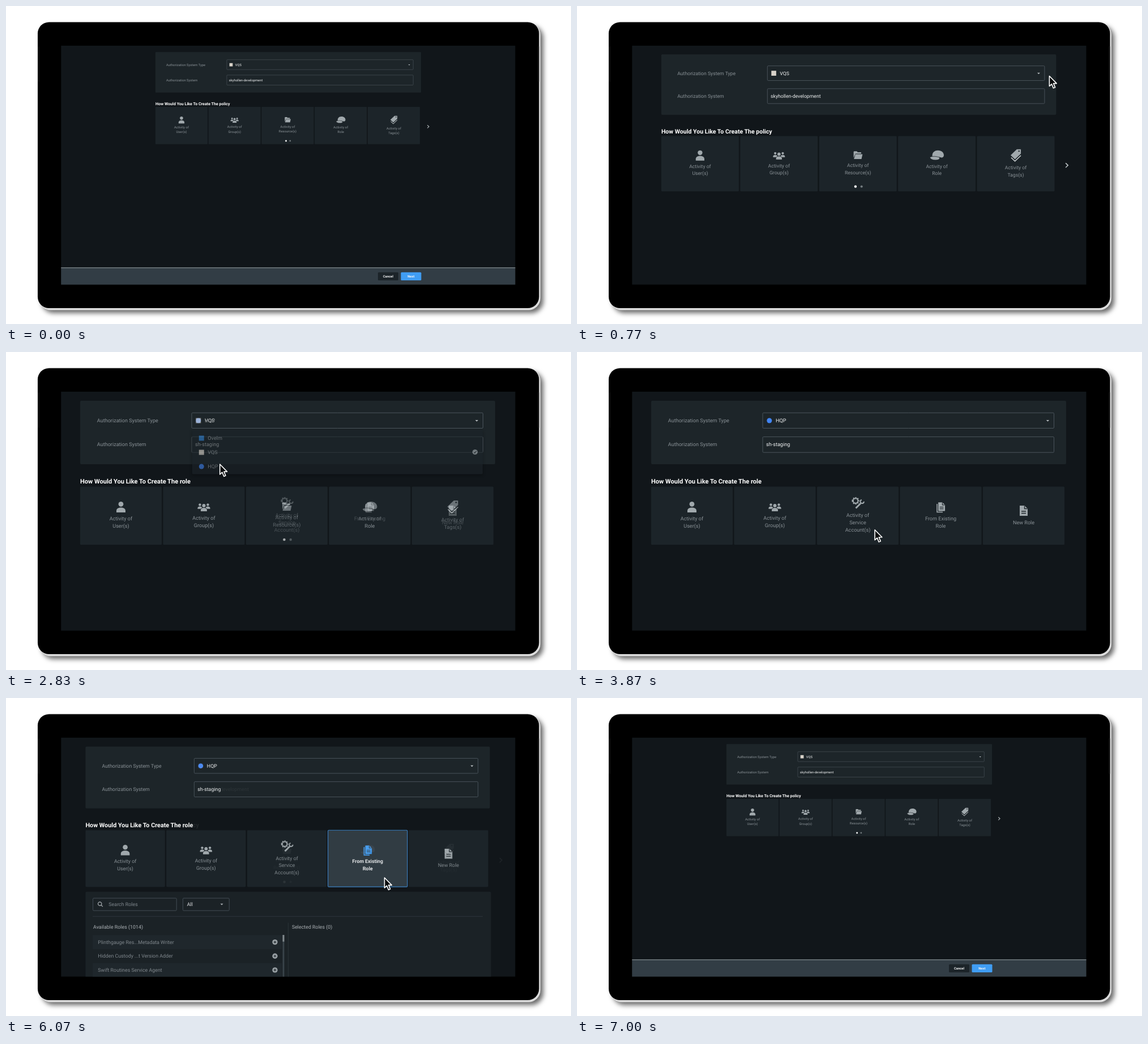
Recreate the animation shown at these times as an HTML page with a canvas. Size 998 by 561 pixels, loop 7.33 s.

```html
<!DOCTYPE html>
<html lang="en">
<head>
<meta charset="utf-8">
<title>Create a policy</title>
<style>
html, body { margin: 0; width: 100%; height: 100%; overflow: hidden; background: #fff; }
canvas { display: block; width: 100vw; height: 100vh; }
</style>
</head>
<body>
<canvas id="stage" width="998" height="561"></canvas>
<script>
const W = 998, H = 561, LOOP = 7330;
const SCREEN = [97.3, 70, 802.2, 421.5];
const PIVOT = [500.2, 72.5], WIDE = 0.64;

const stage = document.getElementById('stage').getContext('2d');
const layer = document.createElement('canvas');
layer.width = W;
layer.height = H;
const spare = layer.getContext('2d');
let c = stage;

const GREY = '#899196', LIGHT = '#b8bec1', WHITE = '#f1f3f4', BLUE = '#409df3', LINE = '#4a545b';
const BRAND = { VQS: '#d8d2c9', HQP: '#4285f4', Ovelm: '#2f7fd0' };
const ROLES = [
  'Plinthgauge Res...Metadata Writer', 'Hidden Custody ...t Version Adder',
  'Swift Routines Service Agent', 'Arranger User', 'Fragment Almanac Writer',
  'QVL Viewer', 'Ledger Reader', 'Queue Editor', 'Network Auditor',
  'Billing Observer', 'Token Issuer', 'Bucket Viewer'
];

const clamp = v => Math.max(0, Math.min(1, v));
const span = (t, a, b) => clamp((t - a) / (b - a));
const mix = (a, b, p) => a + (b - a) * p;
const inOut = p => p < 0.5 ? 2 * p * p : 1 - 2 * (1 - p) ** 2;

function box(x, y, w, h, r, fill, stroke, lw = 1) {
  c.beginPath();
  c.roundRect(x, y, w, h, r);
  if (fill) { c.fillStyle = fill; c.fill(); }
  if (stroke) { c.strokeStyle = stroke; c.lineWidth = lw; c.stroke(); }
}

function disc(x, y, r, fill) {
  c.beginPath();
  c.arc(x, y, r, 0, 7);
  c.fillStyle = fill;
  c.fill();
}

function text(s, x, y, fill, weight = 400, size = 9.1, align = 'left') {
  c.font = `${weight} ${size}px Roboto, sans-serif`;
  c.textAlign = align;
  c.textBaseline = 'middle';
  c.fillStyle = fill;
  c.fillText(s, x, y + 0.4);
}

function shape(d, fill, stroke, lw = 1) {
  const p = new Path2D(d);
  if (fill) { c.fillStyle = fill; c.fill(p); }
  if (stroke) { c.strokeStyle = stroke; c.lineWidth = lw; c.stroke(p); }
}

function at(x, y, draw, scale = 1) {
  c.save();
  c.translate(x, y);
  c.scale(scale, scale);
  draw();
  c.restore();
}

const caret = (x, y) => at(x, y, () => shape('M-2.6 -1.3h5.2l-2.6 2.8z', LIGHT));
const brand = (name, x, y) => box(x - 4.5, y - 4.5, 9, 9, name === 'HQP' ? 4.5 : 0, BRAND[name]);

function person(fill) {
  disc(0, -5.2, 4.4, fill);
  shape('M-8 9.5v-3c0-4 4-5.6 8-5.6s8 1.6 8 5.6v3z', fill);
}

function page(fill, bg) {
  shape('M-7 -9h8.5l5.5 5.5v12.5h-14z', fill);
  shape('M1.5 -8.5v5h5M-4 1h8M-4 4.5h8', null, bg, 1.3);
}

const icons = {
  user: person,
  group(fill) {
    at(-7, -1, () => person(fill), 0.5);
    at(7, -1, () => person(fill), 0.5);
    at(0, 1.5, () => { shape('M-9 10v-4c0-8 18-8 18 0v4z', '#1c2328'); person(fill); }, 0.68);
  },
  folder(fill) {
    shape('M-8 5v-11q0-1.5 1.5-1.5h4.5l1.5 2h6.5v2.5h-10.5z', fill);
    shape('M-4.6 -2h13.2l-2 9h-14z', fill);
  },
  cap(fill) {
    shape('M-8 4c-2-8 3-13 10-13c7 0 11 4 11 9c0 4-4 5-6 4c-4-2-9 0-15 0z', fill);
    shape('M-13 4c4-3 13-2 18 0c1 4-3 5-8 5c-5 0-9-2-10-5z', fill, '#1c2328', 0.8);
  },
  tag(fill) {
    shape('M2 -11h7.5v8l-11 10.5l-8-7.5z', fill);
    shape('M-8.5 4.5l7 6.5l11-10.5', null, '#d3d8da', 1.5);
    disc(6, -7.6, 1.3, '#1c2328');
  },
  tools(fill) {
    c.setLineDash([2.3, 1.7]);
    shape('M-9.6 -4a5.6 5.6 0 1 0 11.2 0a5.6 5.6 0 1 0-11.2 0', null, fill, 2);
    c.setLineDash([]);
    shape('M-8.2 -4a4.2 4.2 0 1 0 8.4 0a4.2 4.2 0 1 0-8.4 0', null, fill, 1.9);
    shape('M-3.5 9l8.5-8.5', null, fill, 3);
    shape('M10.8 -2.8a3.2 3.2 0 1 1-4-3', null, fill, 2);
  },
  pages(fill, bg) {
    shape('M-6.5 -6v14.5h10', null, fill, 1.6);
    at(1.6, -1.2, () => page(fill, bg), 0.85);
  },
  page
};

function card(i, [icon, iconY, firstY, ...lines], on) {
  const x = 131 + 146.5 * i, mid = x + 72;
  const bg = on ? '#333e46' : '#1c2429';
  box(x, 237.5, 144, 102.5, 1.5, bg, on && '#3f87cc', 1.2);
  at(mid, iconY, () => icons[icon](on ? BLUE : '#a0a8ac', bg));
  lines.forEach((s, k) => text(s, mid, firstY + 13.2 * k, on ? WHITE : GREY, on ? 700 : 400, 9.1, 'center'));
}

const SHARED = [
  ['user', 273.5, 293.5, 'Activity of', 'User(s)'],
  ['group', 273, 292.5, 'Activity of', 'Group(s)']
];
const CARDS = {
  first: [...SHARED,
    ['folder', 273, 292, 'Activity of', 'Resource(s)'],
    ['cap', 273, 293.5, 'Activity of', 'Role'],
    ['tag', 273, 296, 'Activity of', 'Tags(s)']],
  second: [...SHARED,
    ['tools', 266.5, 288, 'Activity of', 'Service', 'Account(s)'],
    ['pages', 274, 294, 'From Existing', 'Role'],
    ['page', 280, 301, 'New Role']]
};

function dropdown() {
  c.save();
  c.shadowColor = 'rgba(0,0,0,.45)';
  c.shadowBlur = 5;
  c.shadowOffsetY = 2;
  box(328.8, 138, 513.2, 77.5, 2, '#1b2328');
  c.restore();
  ['Ovelm', 'VQS', 'HQP'].forEach((name, i) => {
    const y = 152 + 25 * i;
    brand(name, 345.3, y);
    text(name, 356.3, y, '#9ba2a6');
  });
  disc(828.5, 176.5, 4.6, '#a9b0b4');
  shape('M826.4 176.6l1.6 1.6l2.8-3', null, '#1b2328', 1.2);
}

function roleList() {
  box(131, 348.8, 735, 420, 2, '#1c2328');
  box(144.5, 360.5, 151.5, 22.5, 1.5, null, LINE);
  box(307.5, 360.5, 84, 22.5, 1.5, null, LINE);
  shape('M153.7 370.7a3.3 3.3 0 1 0 6.6 0a3.3 3.3 0 1 0-6.6 0M159.5 373l2.8 2.8', null, LIGHT, 1.2);
  text('Search Roles', 173, 371.7, GREY);
  text('All', 315, 371.7, WHITE);
  caret(378, 371.7);
  box(144, 393, 707, 1, 0, '#30393f');
  text('Available Roles (1014)', 145, 412.3, LIGHT);
  text('Selected Roles (0)', 505, 412.3, LIGHT);
  box(498, 405, 1, 360, 0, '#2d363c');
  ROLES.forEach((name, i) => {
    const y = 440 + 25.3 * i;
    if (i % 2 === 0) box(144, y - 12.6, 343, 25.3, 0, '#21292e');
    text(name, 153.5, y, GREY);
    disc(474.4, y, 4.8, '#a3abaf');
    shape(`M472 ${y}h4.8M474.4 ${y - 2.4}v4.8`, null, '#20282d', 1.2);
  });
  box(488.3, 427, 3, 340, 0, '#3d474d');
  box(488.3, 427, 3, 12, 0, '#8a9397');
}

function footer() {
  box(0, 461, W, 40, 0, '#323d45');
  box(0, 461, W, 1.6, 0, '#727a7e');
  box(657, 469.8, 36, 14.2, 1.5, '#1c2429');
  box(697.5, 469.8, 36, 14.2, 1.5, BLUE);
  text('Cancel', 675, 477, WHITE, 700, 5.82, 'center');
  text('Next', 715.3, 477, WHITE, 700, 5.82, 'center');
}

const SCENES = {
  policy: { kind: 'VQS', system: 'skyhollen-development', noun: 'policy', cards: 'first', foot: true, arrow: true },
  menu: { kind: 'VQS', system: '', noun: 'role', cards: 'first', menu: true },
  service: { kind: 'HQP', system: 'sh-staging', noun: 'role', cards: 'second' },
  picked: { kind: 'HQP', system: 'sh-staging', noun: 'role', cards: 'second', list: true }
};

function camera(s) {
  c.translate(...PIVOT);
  c.scale(s, s);
  c.translate(-PIVOT[0], -PIVOT[1]);
}

function scene(target, name, s) {
  const v = SCENES[name];
  c = target;
  c.save();
  c.textRendering = 'geometricPrecision';
  c.beginPath();
  c.rect(...SCREEN);
  c.clip();
  c.fillStyle = '#11161a';
  c.fillRect(0, 0, W, H);
  c.save();
  camera(s);
  box(131, 86, 733, 112, 2, '#1d2529');
  text('Authorization System Type', 160.8, 121.3, GREY);
  text('Authorization System', 160.8, 163.3, GREY);
  box(328, 107.3, 514.5, 27.2, 1.5, null, LINE);
  box(328, 149.6, 514.5, 27.6, 1.5, null, LINE);
  brand(v.kind, 339.8, 121);
  text(v.kind, 351, 121.3, WHITE);
  text(v.system, 334, 163.3, WHITE);
  caret(831.5, 121.3);
  text('How Would You Like To Create The ' + v.noun, 131, 228.8, '#fff', 700, 11.1);
  CARDS[v.cards].forEach((d, i) => card(i, d, v.list && i === 3));
  if (v.cards === 'first') {
    disc(491.5, 331, 2.3, '#fff');
    disc(502.8, 331, 2.2, '#727a7e');
  }
  if (v.arrow) shape('M881.6 287.6l4.3 4.1l-4.3 4.1', null, LIGHT, 1.7);
  if (v.menu) dropdown();
  if (v.list) roleList();
  c.restore();
  if (v.foot) {
    camera(s / WIDE);
    footer();
  }
  c.restore();
}

function device() {
  c = stage;
  c.fillStyle = '#fff';
  c.fillRect(0, 0, W, H);
  c.save();
  c.shadowColor = 'rgba(0,0,0,.6)';
  c.shadowBlur = 9;
  c.shadowOffsetX = c.shadowOffsetY = 5;
  box(58, 30, 886, 506.5, 21, '#dedede');
  c.restore();
  box(56, 28.5, 885.5, 504.5, 20, '#000');
  box(56.5, 71, 2, 63, 1, '#1b1b1b');
  box(939.5, 71, 2, 63, 1, '#1b1b1b');
}

function pointer(t) {
  if (t < 340) return null;
  if (t < 2000) {
    const k = (1 - span(t, 340, 1100)) ** 4;
    return [831 + 74 * k, 121.5 + 28 * k];
  }
  if (t < 3500) {
    const u = inOut(span(t, 2000, 2700));
    return [mix(831, 377, u), mix(121.5, 197, u)];
  }
  if (t < 6033) {
    const u = inOut(span(t, 3500, 4233));
    return [mix(377, 666.5, u), mix(197, 316, 1 - (1 - u) ** 5)];
  }
  return [mix(666.5, 1077, inOut(span(t, 6033, 7000))), 316];
}

function cursor([x, y]) {
  c = stage;
  c.save();
  c.beginPath();
  c.rect(...SCREEN);
  c.clip();
  c.lineJoin = 'round';
  at(x + 0.8, y + 1, () =>
    shape('M0 0v18l4.1-3.8l3 7.2l3.1-1.3l-3-7h5.6z', '#090b0c', '#fff', 1.6));
  c.restore();
}

// Each fade: start, end, next scene
const FADES = [
  [1133, 1733, 'menu'],
  [2700, 3033, 'service'],
  [4233, 4783, 'picked'],
  [6000, 7000, 'policy']
];

function draw(t) {
  const zoom = span(t, 340, 838) - span(t, 6000, 7000);
  const s = mix(WIDE, 1, zoom);
  let from = 'policy', to = null, alpha = 0;
  for (const [a, b, name] of FADES) {
    if (t >= b) from = name;
    else if (t > a) { to = name; alpha = span(t, a, b); }
  }
  device();
  scene(stage, from, s);
  if (to) {
    spare.clearRect(0, 0, W, H);
    scene(spare, to, s);
    stage.globalAlpha = alpha;
    stage.drawImage(layer, 0, 0);
    stage.globalAlpha = 1;
  }
  const tip = pointer(t);
  if (tip) cursor(tip);
}

const began = performance.now();
function tick() {
  draw((performance.now() - began) % LOOP);
  requestAnimationFrame(tick);
}
tick();
</script>
</body>
</html>
```
